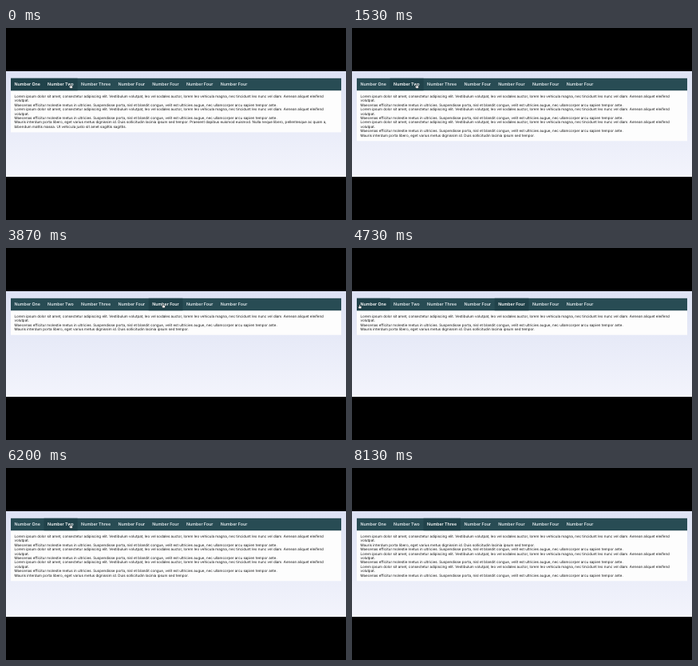
These frames come from a looping animation (426x240 px, 8.19 s). An HTML page:

```html
<!DOCTYPE html>
<html lang="en">
<head>
<meta charset="utf-8">
<title>Tabs</title>
<style>
  html, body { margin: 0; width: 100%; height: 100%; overflow: hidden; background: #000; }
  svg { display: block; width: 100vw; height: 100vh; }
  text { font-family: Inter, "Open Sans", sans-serif; text-rendering: geometricPrecision; }
  .tab text { font-size: 5.32px; font-weight: 600; fill: #e6edf0; }
  .tab rect { fill: none; }
  .tab.on text { fill: #fff; }
  .tab.on rect { fill: #20424a; }
  .panel text { font-size: 4.51px; fill: #141414; }
  .panel rect { fill: #fdfdfd; }
</style>
</head>
<body>
<svg viewBox="0 0 426 240">
  <defs>
    <linearGradient id="sky" x2="0" y2="1">
      <stop stop-color="#dde2f4"/>
      <stop offset="1" stop-color="#f3f4fc"/>
    </linearGradient>
    <clipPath id="page"><rect y="54" width="426" height="132"/></clipPath>
  </defs>
  <rect width="426" height="240"/>
  <g clip-path="url(#page)">
    <rect y="54" width="426" height="132" fill="url(#sky)"/>
    <g id="panels"></g>
    <rect x="6" y="62.8" width="414" height="15.4" fill="#284c54"/>
    <g id="tabs"></g>
    <path id="hand" fill="#fff" stroke="#111" stroke-width=".35" stroke-linejoin="round"
      d="M-.5 0Q0-.5.5 0V1.7L2 2Q2.5 2.2 2.4 3L2 4.7H-.5L-2 2.8Q-1.8 2-.5 2.7Z"/>
  </g>
</svg>
<script>
const LOOP = 8190;
const LINE = 5.41;
const lorem = [
  "Lorem ipsum dolor sit amet, consectetur adipiscing elit. Vestibulum volutpat, leo vel sodales auctor, lorem leo vehicula magna, nec tincidunt leo nunc vel diam. Aenean aliquet eleifend",
  "volutpat."
];
const maecenas = "Maecenas efficitur molestie metus in ultricies. Suspendisse porta, nisl et blandit congue, velit est ultricies augue, nec ullamcorper arcu sapien tempor ante.";
const mauris = "Mauris interdum porta libero, eget varius metus dignissim id. Duis sollicitudin lacinia ipsum sed tempor.";
const pair = [...lorem, maecenas];
const brief = [...pair, mauris];
const contents = [
  [...pair, ...pair,
    mauris + " Praesent dapibus euismod euismod. Nulla neque libero, pellentesque ac quam a,",
    "bibendum mattis massa. Ut vehicula justo sit amet sagittis sagittis."],
  [...pair, ...pair, ...brief],
  [...lorem, mauris, maecenas, ...pair, ...pair],
  brief, brief
];
const names = ["One", "Two", "Three", "Four", "Four", "Four", "Four"];
const edges = [6, 47.6, 89.6, 136, 178.7, 221.4, 264.3, 307];

// [time, tab index]
const clicks = [[0, 0], [500, 1], [2000, 2], [2750, 3], [3600, 4], [4850, 0], [5650, 1], [6800, 2]];
// [start, end, x, y]
const moves = [
  [0, 0, 81, 70.5], [1650, 1900, 102.5, 70.5], [2350, 2650, 153, 67],
  [3150, 3500, 197, 70], [4150, 4600, 9.5, 71], [5150, 5500, 81, 70.5],
  [6400, 6700, 102.5, 70.5], [7450, 7850, 130, 195]
];

function add(parent, tag, attrs = {}, text = "") {
  const el = document.createElementNS("http://www.w3.org/2000/svg", tag);
  for (const key in attrs) el.setAttribute(key, attrs[key]);
  el.textContent = text;
  return parent.appendChild(el);
}

const byId = id => document.getElementById(id);
const hand = byId("hand");

const panels = contents.map(lines => {
  const g = add(byId("panels"), "g", { class: "panel" });
  add(g, "rect", { x: 6, y: 78, width: 414, height: lines.length * LINE + 9.1 });
  lines.forEach((line, i) => add(g, "text", { x: 10.5, y: 87 + i * LINE }, line));
  return g;
});

const tabs = names.map((name, i) => {
  const g = add(byId("tabs"), "g", { class: "tab" });
  add(g, "rect", { x: edges[i], y: 62.8, width: edges[i + 1] - edges[i], height: 15.4 });
  add(g, "text", { x: edges[i] + 4.5, y: 72.45 }, "Number " + name);
  return g;
});

function cursorAt(t) {
  let [, , x, y] = moves[0];
  for (const [start, end, toX, toY] of moves.slice(1)) {
    if (t < start) break;
    const p = Math.min(1, (t - start) / (end - start));
    const k = p * p * (3 - 2 * p);
    x += (toX - x) * k;
    y += (toY - y) * k;
  }
  return [x, y];
}

function draw(now) {
  const t = now % LOOP;
  const [x, y] = cursorAt(t);
  const active = clicks.filter(c => c[0] <= t).pop()[1];
  const inNav = y > 62.8 && y < 78.2;
  panels.forEach((p, i) => p.style.display = i === active ? "" : "none");
  tabs.forEach((tab, i) => {
    const hover = inNav && x >= edges[i] && x < edges[i + 1];
    tab.classList.toggle("on", i === active || hover);
  });
  hand.setAttribute("transform", `translate(${x} ${y})`);
}

const began = performance.now();
function tick() {
  draw(performance.now() - began);
  requestAnimationFrame(tick);
}
tick();
</script>
</body>
</html>
```
